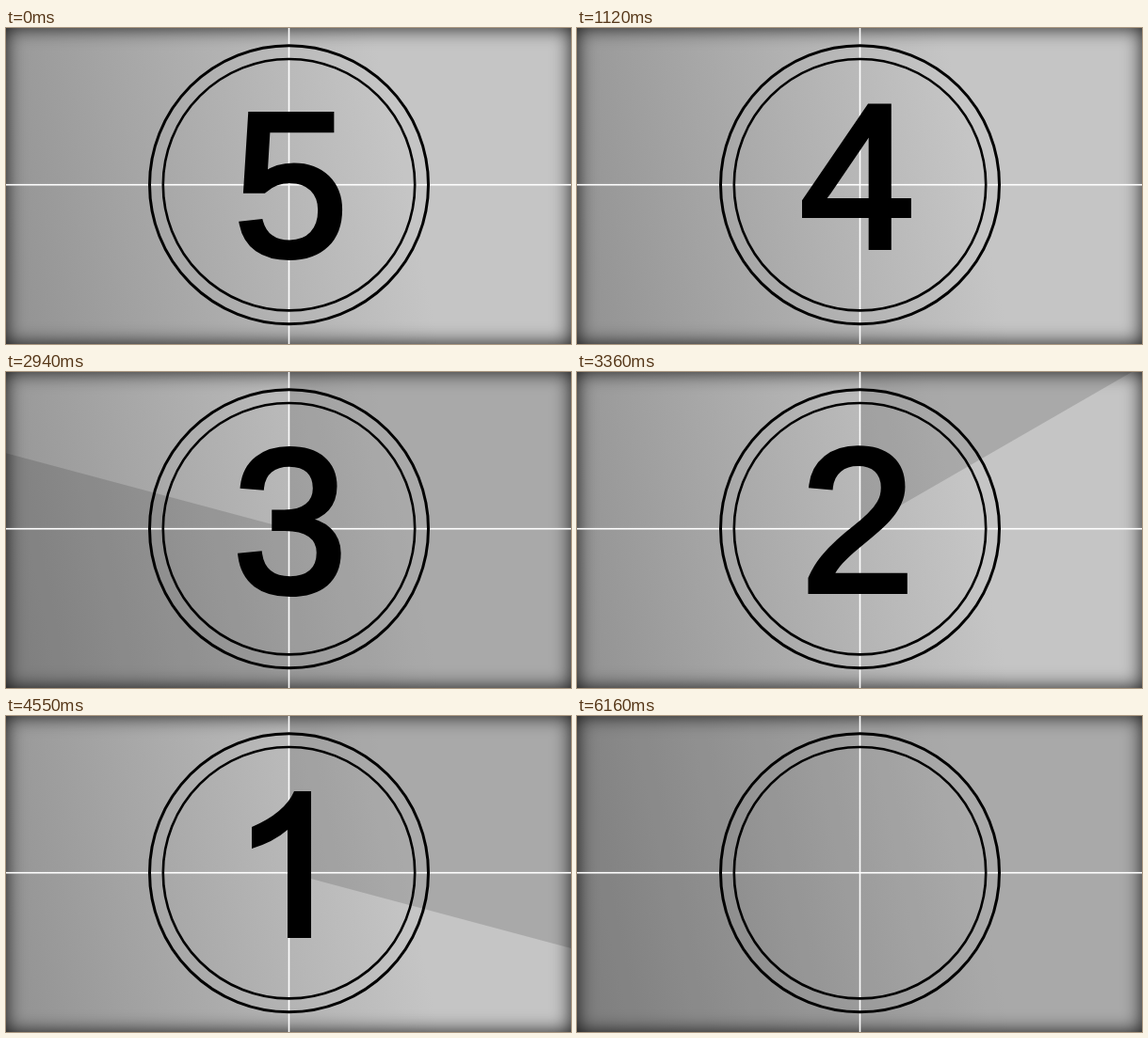
An HTML page with a canvas for the animation above (6.23 s loop, 600 by 336 pixels).

```html
<!DOCTYPE html>
<html lang="en">
<head>
<meta charset="utf-8">
<title>Film leader countdown</title>
<style>
  html, body { margin: 0; width: 100%; height: 100%; overflow: hidden; background: #000; }
  canvas { display: block; }
</style>
</head>
<body>
<canvas id="stage" width="600" height="336"></canvas>
<script>
const W = 600, H = 336, CX = 300.5, CY = 166.7;
const STEP = 70, STEPS = 89;           // picture changes every 70 ms
const PER_DIGIT = 15, COUNT_END = 75;  // steps per digit, end of the countdown
const ctx = document.getElementById('stage').getContext('2d');

// Left edge and baseline of each digit
const place = { 5: [242, 241.5], 4: [237, 233], 3: [241, 233.5], 2: [237.5, 233] };
const one = new Path2D('M261 118Q296 103 306 80H324V236H299V121Q284 134 261 141Z');

const paper = ctx.createLinearGradient(0, 231, 420, 143);
paper.addColorStop(0, 'rgb(148,148,148)');
paper.addColorStop(1, 'rgb(197,197,197)');

function fill(color) {
  ctx.fillStyle = color;
  ctx.fillRect(0, 0, W, H);
}

function sweep(turn) {
  const start = -Math.PI / 2;
  ctx.fillStyle = 'rgba(0,0,0,.143)';
  ctx.beginPath();
  ctx.moveTo(CX, CY);
  ctx.arc(CX, CY, 500, start, start + turn * 2 * Math.PI);
  ctx.fill();
}

// Soft dark edge: the shadow of a border lying outside the stage
function vignette() {
  ctx.save();
  ctx.shadowColor = 'rgba(0,0,0,.85)';
  ctx.shadowBlur = 20;
  ctx.fillStyle = '#000';
  ctx.beginPath();
  ctx.rect(-60, -60, W + 120, H + 120);
  ctx.rect(0, 0, W, H);
  ctx.fill('evenodd');
  ctx.restore();
}

function ring(radius, width) {
  ctx.lineWidth = width;
  ctx.beginPath();
  ctx.arc(CX, CY, radius, 0, 2 * Math.PI);
  ctx.stroke();
}

function drawDigit(digit) {
  ctx.fillStyle = ctx.strokeStyle = '#000';
  if (digit === 1) return ctx.fill(one);
  const [x, y] = place[digit];
  ctx.font = '218px "Liberation Sans", Arial, sans-serif';
  ctx.lineWidth = 6;
  ctx.lineJoin = 'miter';
  ctx.fillText(digit, x, y);
  ctx.strokeText(digit, x, y);
}

function leader(turn, digit) {
  fill(paper);
  sweep(turn);
  vignette();
  ctx.fillStyle = '#fff';
  ctx.fillRect(CX - 0.8, 0, 1.6, H);
  ctx.fillRect(0, CY - 0.8, W, 1.6);
  ctx.strokeStyle = '#000';
  ring(148, 3);
  ring(133.7, 2.6);
  if (digit) drawDigit(digit);
}

function flash() {
  ctx.globalCompositeOperation = 'lighter';
  fill('rgb(98,98,98)');
  ctx.globalCompositeOperation = 'source-over';
}

function draw(step) {
  if (step < COUNT_END) {
    const phase = step % PER_DIGIT;
    const digit = 5 - Math.floor(step / PER_DIGIT);
    // 25 film frames per digit: one flash, then 15 degrees each
    const notch = Math.floor(phase * 25 / PER_DIGIT) - 1;
    const flashing = phase === 0 && step > 0;
    leader(flashing ? 1 : Math.max(0, notch) / 24, digit);
    if (flashing) flash();
  } else {
    // Fade to black, hold, fade the empty leader back in
    const light = Math.max((77 - step) / 3, (step - 80) / 8, 0);
    leader(1);
    fill(`rgba(0,0,0,${1 - light})`);
  }
}

function tick() {
  draw(Math.floor(performance.now() / STEP) % STEPS);
  requestAnimationFrame(tick);
}
tick();
</script>
</body>
</html>
```
